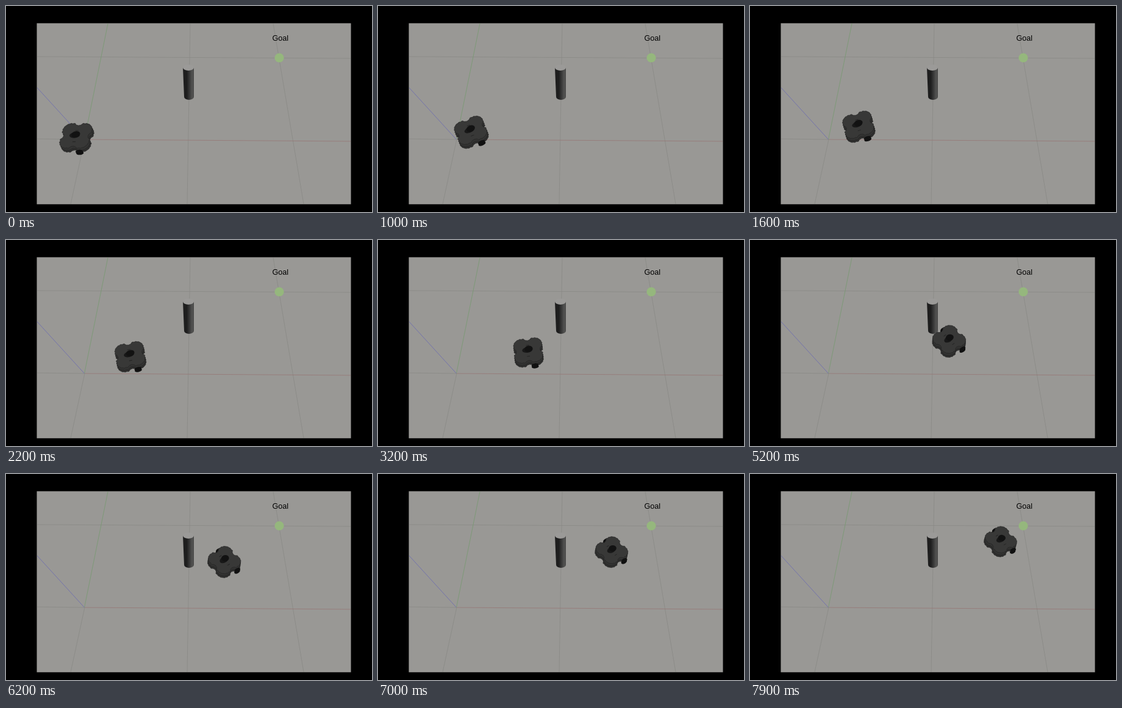
An HTML page with a canvas for the animation above (8 s loop, 600 px wide and 338 px high).

```html
<!DOCTYPE html>
<html>
<head>
<meta charset="utf-8">
<style>
  html, body { margin: 0; width: 100%; height: 100%; overflow: hidden; background: #000; }
  canvas { display: block; }
</style>
</head>
<body>
<canvas id="stage" width="600" height="338"></canvas>
<script>
const ctx = document.getElementById('stage').getContext('2d');
const LOOP = 8000, STEP = 100, SPEED = 4.4, TILT = 0.85;

// Local perspective of the floor: size grows downwards, verticals fan out from x = 300
const scaleAt = y => 0.82 + 0.00085 * y;
const leanAt = x => (300 - x) * 0.0012;

// A steering move: quick smooth rise, then slow decay
function swerve(t, start, rise, peak, decay) {
  const u = Math.max(0, Math.min(1, (t - start) / rise));
  const after = Math.max(0, t - start - rise);
  return peak * u * u * (3 - 2 * u) * Math.exp(-after / decay);
}
const headingAt = t => (swerve(t, 0, 900, 29, 1800) + swerve(t, 4200, 800, 37, 20000)) * Math.PI / 180;

// Drive along the heading, speeding up from rest
function drive() {
  const poses = [];
  let x = 114.5, y = 213;
  for (let t = 0; t < LOOP; t += STEP) {
    const turn = headingAt(t);
    poses.push({ x, y, turn });
    const step = SPEED * Math.min(1, (t + STEP / 2) / 300) * scaleAt(y);
    x += step * (Math.cos(turn) + leanAt(x) * Math.sin(turn));
    y -= step * TILT * Math.sin(turn);
  }
  return poses;
}
const poses = drive();

function line(x1, y1, x2, y2, color) {
  ctx.beginPath();
  ctx.moveTo(x1, y1);
  ctx.lineTo(x2, y2);
  ctx.strokeStyle = color;
  ctx.lineWidth = 0.8;
  ctx.stroke();
}

function ellipse(x, y, rx, ry, color) {
  ctx.fillStyle = color;
  ctx.beginPath();
  ctx.ellipse(x, y, rx, ry, 0, 0, 7);
  ctx.fill();
}

function drawFloor() {
  ctx.fillStyle = '#000';
  ctx.fillRect(0, 0, 600, 338);
  ctx.fillStyle = '#999895';
  ctx.fillRect(50.5, 28.3, 515, 297);
  const grid = '#8a8986';
  line(51, 83, 565, 86, grid);
  line(302, 29, 297, 325, grid);
  line(438, 29, 488, 325, grid);
  line(129, 219, 106, 325, grid);
  line(51, 218, 129, 219, grid);
  line(129, 219, 565, 222, '#967775');
  line(128.5, 219, 167, 29, '#769a70');
  line(51, 134, 128.5, 219, '#6a6ab2');
}

function drawPillar() {
  const shade = ctx.createLinearGradient(290, 0, 308, 0);
  shade.addColorStop(0, '#1e1e1e');
  shade.addColorStop(0.35, '#1e1e1e');
  shade.addColorStop(0.85, '#535352');
  shade.addColorStop(1, '#464645');
  ctx.fillStyle = shade;
  ctx.beginPath();
  ctx.moveTo(290, 101);
  ctx.lineTo(292, 149);
  ctx.ellipse(300, 149, 8, 5, 0, Math.PI, 0, true);
  ctx.lineTo(308, 101);
  ctx.fill();
  ellipse(299, 101, 9, 5, '#9b9a98');
}

function drawGoal() {
  ellipse(448, 85, 7.6, 7.6, '#95b77d');
  ctx.fillStyle = '#000';
  ctx.font = '12.6px "Liberation Sans", Arial, sans-serif';
  ctx.textAlign = 'center';
  ctx.fillText('Goal', 449.8, 57);
}

// Square plate with scalloped edges and a small notch in each side
function makePlate() {
  const path = new Path2D(), half = 24, reach = 18;
  for (let side = 0; side < 4; side++) {
    const c = Math.cos(side * Math.PI / 2), s = Math.sin(side * Math.PI / 2);
    for (let u = -reach; u <= reach; u += 0.5) {
      const a = Math.abs(u);
      const notch = 3.5 * Math.max(0, Math.min(1, (6 - a) / 3));
      const scallop = 0.8 * (1 - Math.abs(Math.sin(u * Math.PI / 5)));
      const round = Math.max(0, a - 12) ** 2 * 0.06;
      const v = half - notch - scallop - round;
      path.lineTo(v * c - u * s, v * s + u * c);
    }
  }
  path.closePath();
  return path;
}
const plate = makePlate();

function drawRobot({ x, y, turn }) {
  const scale = scaleAt(y);

  // Runs a drawing in the robot's own plane, lowered by drop pixels
  function layer(drop, draw) {
    ctx.save();
    ctx.translate(x + (300 - x) * 0.0025 * drop, y + drop);
    ctx.transform(scale, 0, -leanAt(x) * scale, TILT * scale, 0, 0);
    ctx.rotate(-turn);
    draw();
    ctx.restore();
  }
  function sheet(drop, fill) {
    layer(drop, () => {
      ctx.fillStyle = fill;
      ctx.fill(plate);
      ctx.strokeStyle = '#222';
      ctx.lineWidth = 0.7;
      ctx.stroke(plate);
    });
  }
  function wheel(side) {
    for (const drop of [7, 4.5]) {
      layer(drop, () => ellipse(9, side * 25, 6, 3.5, '#111'));
    }
  }

  wheel(-1);
  sheet(6.5, '#2f2f2e');
  sheet(3.5, '#333332');
  wheel(1);
  sheet(0, '#383837');
  layer(0, () => {
    ctx.fillStyle = '#222';
    for (const side of [-1, 1]) ctx.fillRect(-3, side * 11, 5, 1);
  });

  // Scanner: wide foot with a round head
  layer(-1, () => ellipse(-1.5, 0, 8.5, 5.5, '#181818'));
  layer(-2.5, () => ellipse(1, 0, 7, 6.2, '#121212'));
}

function frame(now) {
  drawFloor();
  drawPillar();
  drawGoal();
  drawRobot(poses[Math.floor(now % LOOP / STEP)]);
  requestAnimationFrame(frame);
}
frame(0);
</script>
</body>
</html>
```
